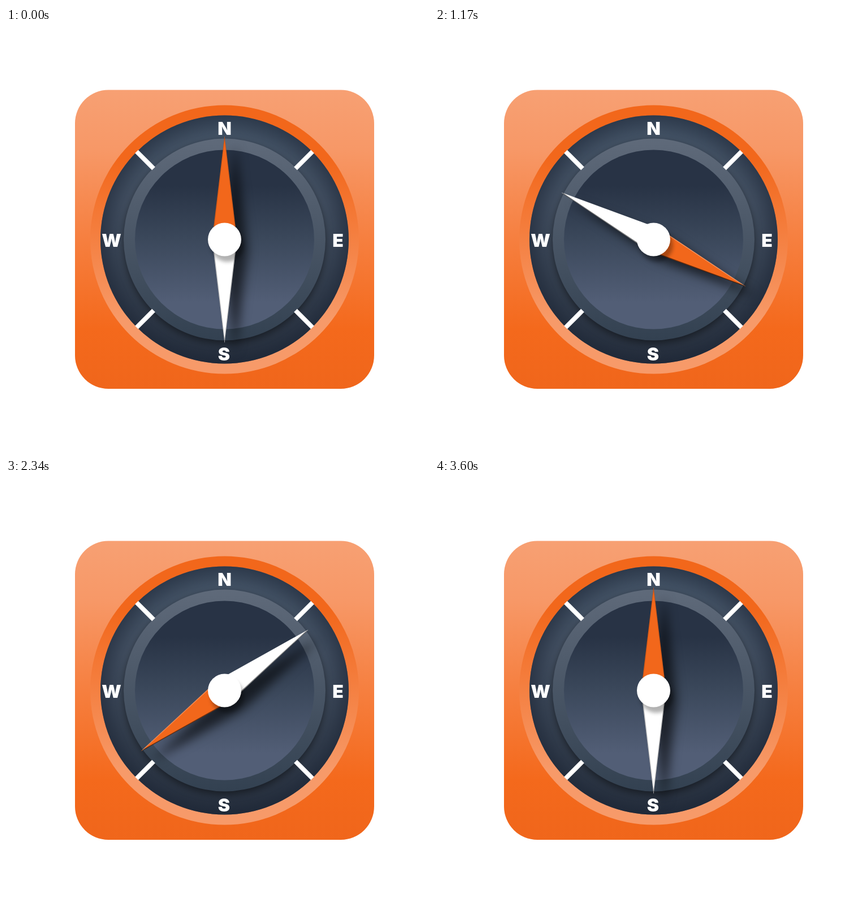
Animation of 748x748 px, one loop 4.6 s. Source, as an HTML page:

```html
<!DOCTYPE html>
<html lang="en">
<head>
<meta charset="utf-8">
<title>Compass</title>
<style>
  html, body { margin: 0; width: 100%; height: 100%; overflow: hidden; background: #fff; }
  svg { display: block; width: 100%; height: 100%; }
  text { font: 900 32px Inter, "Open Sans", sans-serif; text-anchor: middle; fill: #fff; }
  #bezel { filter: drop-shadow(0 5px 7px rgba(0, 0, 0, .5)); }
  #cast { filter: drop-shadow(19px 17px 9px rgba(0, 0, 0, .6)); }
  #hub { filter: drop-shadow(5px 10px 3px rgba(0, 0, 0, .3)); }
</style>
</head>
<body>
<svg viewBox="0 0 748 748">
  <defs>
    <linearGradient id="case" x2="0" y2="1">
      <stop offset="0" stop-color="#f7a073"/>
      <stop offset=".2" stop-color="#f79867"/>
      <stop offset=".5" stop-color="#f67f3f"/>
      <stop offset=".8" stop-color="#f4691c"/>
      <stop offset="1" stop-color="#f0661b"/>
    </linearGradient>
    <linearGradient id="rim" x2="0" y2="1">
      <stop offset=".2" stop-color="#f2671b"/>
      <stop offset=".8" stop-color="#f79a69"/>
    </linearGradient>
    <linearGradient id="dial" x2="0" y2="1">
      <stop offset="0" stop-color="#435366"/>
      <stop offset=".35" stop-color="#435062"/>
      <stop offset="1" stop-color="#28313f"/>
    </linearGradient>
    <radialGradient id="edge">
      <stop offset=".83" stop-color="#172030" stop-opacity="0"/>
      <stop offset="1" stop-color="#172030" stop-opacity=".5"/>
    </radialGradient>
    <linearGradient id="ring" x2="0" y2="1">
      <stop offset="0" stop-color="#5f6a7a"/>
      <stop offset="1" stop-color="#334151"/>
    </linearGradient>
    <linearGradient id="face" x2="0" y2="1">
      <stop offset=".2" stop-color="#283345"/>
      <stop offset=".5" stop-color="#3b485b"/>
      <stop offset=".85" stop-color="#525e76"/>
    </linearGradient>
  </defs>
  <rect x="122" y="109.5" width="529" height="528.5" rx="59" fill="url(#case)"/>
  <g transform="translate(386.5 374)">
    <circle r="237.5" fill="url(#rim)"/>
    <circle r="219.5" fill="url(#dial)"/>
    <circle r="219.5" fill="url(#edge)"/>
    <circle id="bezel" r="178.5" fill="url(#ring)"/>
    <circle r="158.5" fill="url(#face)"/>
    <path d="M125.5-125.5l30-30M125.5 125.5l30 30M-125.5 125.5l-30 30M-125.5-125.5l-30-30" stroke="#fff" stroke-width="8"/>
    <text y="-185">N</text>
    <text x="200.5" y="13">E</text>
    <text x="-1" y="214">S</text>
    <text x="-200" y="13">W</text>
    <g id="cast">
      <g id="needle">
        <path d="M0-183L22 0H-22Z" fill="#f2671b"/>
        <path d="M0 183L22 0H-22Z" fill="#fff"/>
      </g>
    </g>
    <circle id="hub" r="29.5" fill="#fff"/>
  </g>
</svg>
<script>
  const needle = document.getElementById("needle");
  const edges = [];
  for (const end of [-1, 1]) {
    for (const side of [-1, 1]) {
      const line = document.createElementNS("http://www.w3.org/2000/svg", "path");
      line.setAttribute("d", `M0 ${end * 180}L${side * 21.2} 0`);
      line.setAttribute("stroke-width", 1.5);
      needle.append(line);
      edges.push({ line, nx: side * .993, ny: end * .119 });
    }
  }

  // Light falls from above: edges facing up glow, the others darken.
  function draw(time) {
    const angle = Math.min(Math.floor(time % 4600 / 30) * 3, 360);
    const a = angle * Math.PI / 180;
    needle.setAttribute("transform", `rotate(${angle})`);
    for (const { line, nx, ny } of edges) {
      const shade = nx * Math.sin(a) + ny * Math.cos(a) + .4;
      line.setAttribute("stroke", shade > 0 ? "#000" : "#fff");
      line.setAttribute("stroke-opacity", shade > 0 ? shade * .42 : -shade * .7);
    }
  }

  function tick() {
    draw(performance.now());
    requestAnimationFrame(tick);
  }
  tick();
</script>
</body>
</html>
```
